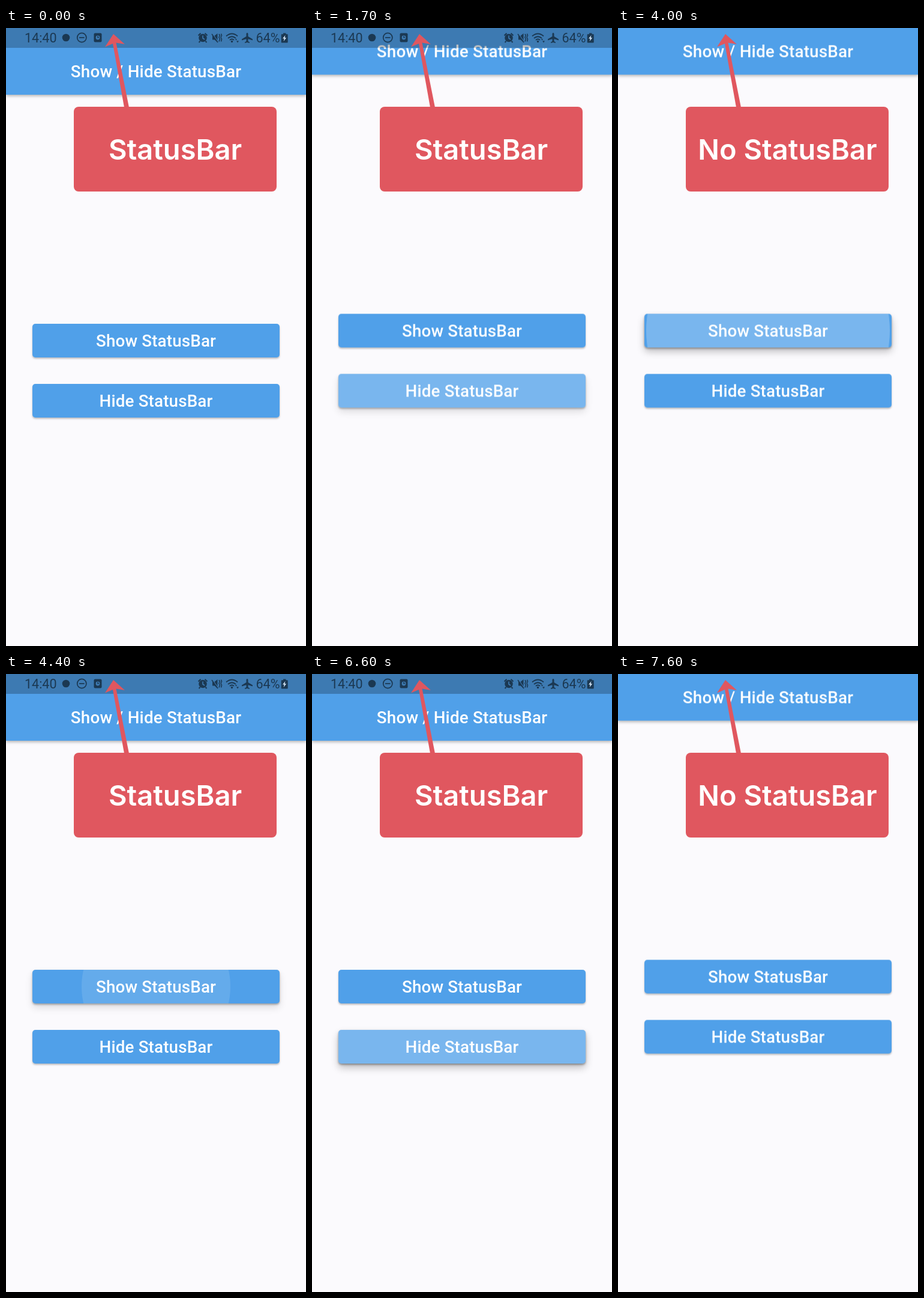
An HTML page that plays this animation: 500 by 1028 pixels, repeating every 8000 ms.

```html
<!DOCTYPE html>
<html lang="en">
<head>
<meta charset="utf-8">
<title>Show / Hide StatusBar</title>
<style>
  html, body { margin: 0; width: 100%; height: 100%; overflow: hidden; background: #fbfafd; }
  .stage { position: relative; width: 500px; height: 1028px; overflow: hidden; background: #fbfafd;
    font: 500 27.78px Roboto, sans-serif; color: #fff; text-align: center; }
  .stage * { animation-duration: 8s; animation-timing-function: step-end; animation-iteration-count: infinite; }

  .header { position: absolute; top: 0; left: 0; width: 500px; height: 111px; background: #50a0e9;
    box-shadow: 0 2px 5px rgba(0,0,0,.3); animation-name: header; }
  .header span { position: absolute; left: 0; right: 0; bottom: 0; line-height: 77px; letter-spacing: .2px; }

  .buttons { position: absolute; inset: 0; animation-name: buttons; }
  .button { position: absolute; left: 44px; width: 412px; height: 56px; top: 491.5px; line-height: 57px;
    border-radius: 5px; background: #50a0e9; letter-spacing: .15px; box-shadow: 0 2px 3px rgba(0,0,0,.26); }
  .button.hide { top: 591.5px; }
  .button::before { content: ""; position: absolute; inset: 0; border-radius: 5px; opacity: 0;
    box-shadow: 0 7px 13px rgba(0,0,0,.24), 0 2px 5px rgba(0,0,0,.12);
    animation: var(--lift) 8s step-end infinite; }
  .clip { position: absolute; inset: 0; overflow: hidden; border-radius: 5px; }
  .splash { position: absolute; left: var(--x); top: 28px; width: 496px; height: 496px; margin: -248px;
    border-radius: 50%; background: rgba(255,255,255,.24); transform: scale(0); animation-name: var(--splash); }
  .button span { position: relative; }
  .show { --x: 206px; --lift: show-lift; --splash: show-splash; }
  .hide { --x: 233.5px; --lift: hide-lift; --splash: hide-splash; }

  svg { position: absolute; inset: 0; }
  .on { animation-name: on; }
  .off { animation-name: off; }
  .label { font: 600 47px Inter, sans-serif; text-anchor: middle; }
  .system { font: 400 21.5px Roboto, sans-serif; }

  @keyframes header {
    0%, 53.75% { transform: none; }
    20%, 85%, 100% { transform: translateY(-33.4px); }
  }
  @keyframes buttons {
    0%, 53.75% { transform: none; }
    20%, 85%, 100% { transform: translateY(-16.6px); }
  }
  @keyframes on {
    0%, 53.75% { opacity: 1; }
    23.75%, 87.5%, 100% { opacity: 0; }
  }
  @keyframes off {
    0%, 53.75% { opacity: 0; }
    23.75%, 87.5%, 100% { opacity: 1; }
  }

  /* A press grows the splash for 1.1 s; release fades it over 0.2 s. */
  @keyframes hide-splash {
    0% { transform: scale(0); opacity: 1; }
    6.25%, 62.5% { transform: scale(0); opacity: 1; animation-timing-function: steps(11); }
    20%, 76.25% { transform: scale(1); opacity: 1; }
    21.25%, 86.25% { transform: scale(1); opacity: 1; animation-timing-function: steps(2); }
    23.75%, 88.75%, 100% { transform: scale(0); opacity: 0; }
  }
  @keyframes show-splash {
    0% { transform: scale(0); opacity: 1; }
    38.75% { transform: scale(0); opacity: 1; animation-timing-function: steps(11); }
    52.5% { transform: scale(1); opacity: 1; }
    53.75% { transform: scale(1); opacity: 1; animation-timing-function: steps(2); }
    56.25%, 100% { transform: scale(0); opacity: 0; }
  }
  @keyframes hide-lift {
    0% { opacity: 0; }
    6.25%, 62.5% { opacity: 0; animation-timing-function: steps(4); }
    11.25%, 67.5% { opacity: 1; }
    20%, 85% { opacity: 1; animation-timing-function: steps(2); }
    22.5%, 87.5%, 100% { opacity: 0; }
  }
  @keyframes show-lift {
    0% { opacity: 0; }
    38.75% { opacity: 0; animation-timing-function: steps(4); }
    43.75% { opacity: 1; }
    53.75% { opacity: 1; animation-timing-function: steps(2); }
    56.25%, 100% { opacity: 0; }
  }
</style>
</head>
<body>
<div class="stage">
  <div class="buttons">
    <div class="button show"><div class="clip"><div class="splash"></div></div><span>Show StatusBar</span></div>
    <div class="button hide"><div class="clip"><div class="splash"></div></div><span>Hide StatusBar</span></div>
  </div>
  <div class="header"><span>Show / Hide StatusBar</span></div>

  <svg width="500" height="1028" viewBox="0 0 500 1028">
    <g class="on system" fill="#1b3852">
      <rect width="500" height="33" fill="#000" fill-opacity=".235"/>
      <text x="31" y="24">14:40</text>
      <circle cx="100" cy="16" r="6.3"/>
      <g fill="none" stroke="#1b3852" stroke-width="1.7">
        <circle cx="126.300" cy="16" r="7.600"/>
        <path d="M122 16h8.600"/>
      </g>
      <!-- app notice -->
      <rect x="146.500" y="8.500" width="13" height="15" rx="2"/>
      <circle cx="153" cy="16" r="3.400" fill="#3d7ab2"/>
      <path d="M152.300 13.500v3h2.500v-1.500h-1v-1.500z"/>
      <!-- alarm -->
      <circle cx="328" cy="16.500" r="6.800"/>
      <g fill="none" stroke="#1b3852" stroke-width="2">
        <path d="M320.500 12.500l4-3.700M335.500 12.500l-4-3.700M323.500 22l-2 2M332.500 22l2 2"/>
        <path d="M328 12.500v4.500l3 2" stroke="#3d7ab2" stroke-width="1.600"/>
      </g>
      <!-- muted -->
      <path d="M344 13h3.500l5-4v15l-5-4.500H344z"/>
      <path d="M343.500 9l10 14" stroke="#3d7ab2" stroke-width="1.500"/>
      <path d="M343 10l10 14M355 10l1.500 2.500-1.500 3 1.500 3-1.500 4M358.500 9.500l1 3-1.500 3 1.500 3-1 4" fill="none" stroke="#1b3852" stroke-width="1.500"/>
      <!-- wireless -->
      <g fill="none" stroke="#1b3852" stroke-width="1.800">
        <path d="M367 13.500q9.500-8 19 0M370 17q6.500-5.500 13 0M373 20q3.500-3 7 0"/>
      </g>
      <circle cx="376.500" cy="22.500" r="1.700"/>
      <path d="M382 20h3l-1.500-2.500zM384 21.500h4l-2 3z"/>
      <!-- flight mode -->
      <path d="M402 8q1.500 0 1.500 2v4l7.500 4.500v2l-7.500-2.300v3.800l2.500 1.700v1.300l-4-1-4 1v-1.300l2.500-1.700v-3.800L393 20.500v-2l7.500-4.500v-4q0-2 1.500-2z"/>
      <text x="416.500" y="24">64%</text>
      <!-- battery -->
      <path d="M462 8.500h4.500v1.700h2.500q.700 0 .700.800v12.500q0 1-1 1h-9q-1 0-1-1V11q0-.800.800-.800h2.500z"/>
      <path d="M465.500 12l-4.500 5.500h2.700l-1 4.500 4.500-5.700h-2.700z" fill="#d8e8f7"/>
    </g>

    <g fill="#e0575f">
      <path d="M179 10L198 27 183.500 24.500 205 132H197L178 26 165 31.500z"/>
      <rect x="113" y="131" width="338" height="141" rx="8"/>
    </g>
    <g class="label" fill="#fff">
      <text class="on" x="282" y="218.500">StatusBar</text>
      <text class="off" x="282.500" y="218.500">No StatusBar</text>
    </g>
  </svg>
</div>
</body>
</html>
```
